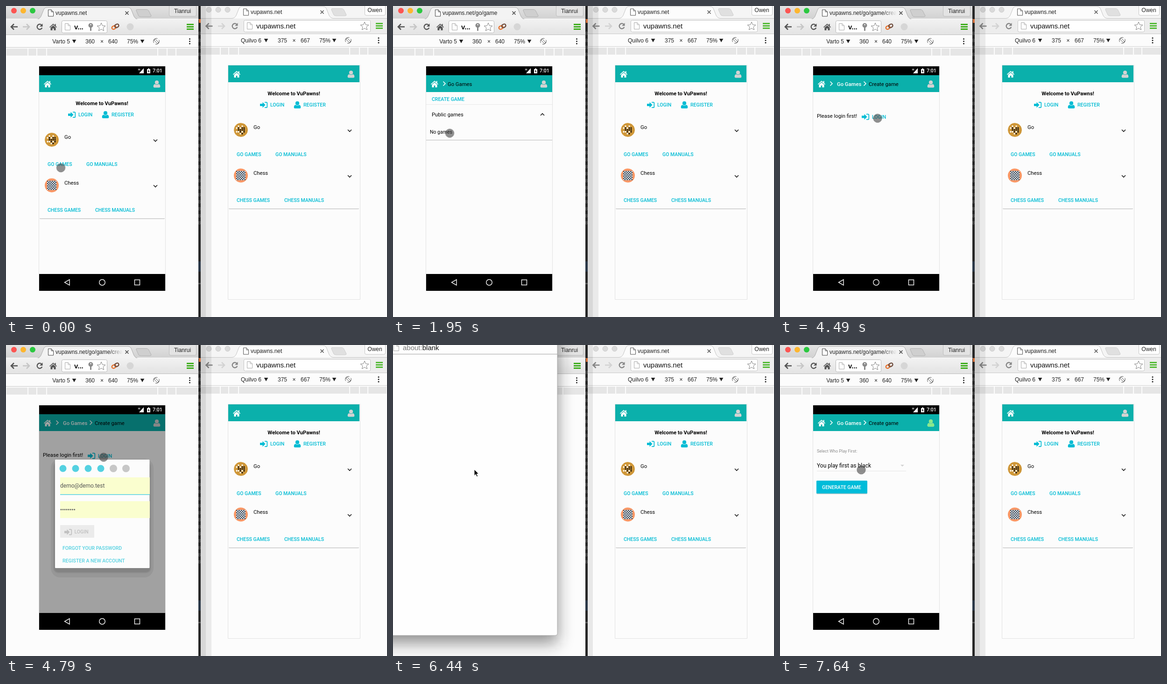
An HTML page that plays this animation: 816 px wide and 665 px high, repeating every 8 s.

```html
<!DOCTYPE html>
<html lang="en">
<head>
<meta charset="utf-8">
<title>Board games demo</title>
<style>
html, body { margin: 0; width: 100%; height: 100%; overflow: hidden; background: #fcfcfc; }
svg { display: block; width: 100%; height: 100%; }
text { white-space: pre; }
.ui { font: 12px "Liberation Sans", Arial, sans-serif; fill: #222; }
.url { font-size: 15px; fill: #111; }
.app { font: 11.25px Roboto, sans-serif; fill: #000; }
.btn { font-size: 10.5px; font-weight: 500; fill: #00bcd4; }
.cyan { fill: #00bcd4; color: #00bcd4; }
.line { fill: none; stroke: currentColor; }

/* One loop is 8 s; 1.875% is 150 ms. */
.anim { animation: 8s step-end infinite; }
.home { animation-name: home; }
.game { animation-name: game; }
.create { animation-name: create; }
.ask { animation-name: ask; }
.form { animation-name: form; }
.dialog { animation-name: dialog; }
.focus { animation-name: focus; }
.hover { animation-name: hover; }
.popup { animation-name: popup; }
.front { animation-name: front; }
.arrow { animation-name: arrow; }
.touch { animation-name: touch; }
.path { animation-name: path; }

@keyframes home { 0% { visibility: visible } 7.5%, 100% { visibility: hidden } }
@keyframes game { 0% { visibility: hidden } 7.5% { visibility: visible } 37.5%, 100% { visibility: hidden } }
@keyframes create { 0% { visibility: hidden } 37.5%, 100% { visibility: visible } }
@keyframes ask { 0% { visibility: hidden } 37.5% { visibility: visible } 93.625%, 100% { visibility: hidden } }
@keyframes form { 0% { visibility: hidden } 93.625%, 100% { visibility: visible } }
@keyframes dialog {
  0% { opacity: 0 }
  56.125% { opacity: 0; animation-timing-function: steps(3) }
  61.75% { opacity: 1 }
  93.625% { opacity: .4 }
  95.5%, 100% { opacity: 0 }
}
@keyframes focus { 0% { visibility: visible } 89.875%, 100% { visibility: hidden } }
@keyframes hover { 0% { opacity: 0 } 67.375% { opacity: 1 } 74.875% { opacity: .25 } 89.875%, 100% { opacity: 1 } }
@keyframes popup { 0% { visibility: hidden } 78.625% { visibility: visible } 89.875%, 100% { visibility: hidden } }
@keyframes front { 0% { visibility: visible } 78.625% { visibility: hidden } 89.875%, 100% { visibility: visible } }
@keyframes arrow { 0% { visibility: hidden } 74.875% { visibility: visible } 91.75%, 100% { visibility: hidden } }
@keyframes touch { 0% { visibility: visible } 74.875% { visibility: hidden } 91.75%, 100% { visibility: visible } }
@keyframes path {
  0% { transform: translate(117.5px, 346px) }
  5.625% { transform: translate(117.5px, 346px); animation-timing-function: steps(4) }
  13.125% { transform: translate(125px, 204px); animation-timing-function: steps(5) }
  22.5% { transform: translate(128px, 277px) }
  24.375% { transform: translate(121.5px, 272px) }
  26.25% { transform: translate(124px, 251px); animation-timing-function: steps(3) }
  31.875% { transform: translate(119px, 203px) }
  37.5% { transform: translate(119px, 203px); animation-timing-function: steps(5) }
  46.75% { transform: translate(209px, 240px) }
  59.875% { transform: translate(209px, 240px); animation-timing-function: steps(4) }
  67.375% { transform: translate(174px, 266px) }
  95.5%, 100% { transform: translate(174px, 267px) }
}
</style>
</head>
<body>
<svg viewBox="0 0 816 665" preserveAspectRatio="none">
<defs>
  <linearGradient id="strip" x2="0" y2="1"><stop stop-color="#e2e2e2"/><stop offset="1" stop-color="#d2d2d2"/></linearGradient>
  <linearGradient id="bar" x2="0" y2="1"><stop stop-color="#f2f2f2"/><stop offset="1" stop-color="#e3e3e3"/></linearGradient>
  <linearGradient id="fade"><stop stop-color="#f3f3f3" stop-opacity="0"/><stop offset="1" stop-color="#f3f3f3"/></linearGradient>
  <filter id="soft" x="-30%" y="-30%" width="160%" height="160%"><feGaussianBlur stdDeviation="17"/></filter>
  <filter id="glow" x="-10%" y="-10%" width="120%" height="120%"><feGaussianBlur stdDeviation="1.5"/></filter>
  <clipPath id="title"><path d="M100 4H249V26H100z"/></clipPath>
  <clipPath id="disc"><circle r="15"/></clipPath>
  <pattern id="check" width="5" height="5" patternUnits="userSpaceOnUse">
    <path fill="#fff" d="M0 0h5v5H0z"/><path fill="#1d3044" d="M0 0h2.5v2.5H0zM2.5 2.5h2.5v2.5H2.5z"/>
  </pattern>
  <pattern id="grid" width="4" height="4" patternUnits="userSpaceOnUse">
    <path d="M0 0H4M0 0V4" stroke="#a87424" stroke-width=".6"/>
  </pattern>
  <pattern id="digits" width="6" height="15" patternUnits="userSpaceOnUse" x="412" y="95">
    <text x="-1" y="12" font-family="Liberation Mono, monospace" font-size="11" fill="#666">8</text>
  </pattern>

  <path id="house" d="M0 8 8 .8 11.5 4V1.6h2.2V6L16 8l-1 1.2L8 3 1 9.2zM2.5 9.2 8 4.4l5.5 4.8V15h-4v-4h-3v4h-4z"/>
  <g id="user"><circle cy="-3.6" r="4.1"/><path d="M-4 0C-7 .6-7.3 3.6-7.3 5.5Q-7.3 7.6-5 7.6H5Q7.3 7.6 7.3 5.5C7.3 3.6 7 .6 4 0Q0 2.5-4 0z"/></g>
  <g id="enter"><path d="M0-2.5H5.5V-6L11.5 0 5.5 6V2.5H0z"/><path class="line" stroke-width="1.7" d="M10-5.7H13.5Q15.3-5.7 15.3-4V4Q15.3 5.7 13.5 5.7H10"/></g>
  <path id="down" class="line" stroke-width="1.7" d="M-4-2 0 2 4-2"/>
  <path id="next" class="line" stroke-width="1.6" d="M-2.5-4.5 2 0-2.5 4.5"/>
  <path id="tri" d="M-4.3-3.5H4.3L0 4z"/>
  <path id="page" d="M.5.5H7L11.5 5V14.5H.5zM7 .5V5H11.5"/>
  <path id="back" class="line" stroke-width="2.6" d="M8 0H-6M0-6-6 0 0 6"/>
  <g id="reload"><path class="line" stroke-width="2.3" d="M4-4A5.5 5.5 0 1 0 5.3 2"/><path d="M6.5-7V-.5H0z" fill="currentColor"/></g>
  <path id="star" d="M0-9 2.5-2.9 9-2.5 4 1.7 5.6 8 0 4.6-5.6 8-4 1.7-9-2.5-2.5-2.9z" fill="#fff" stroke="#858585"/>
  <path id="menu" d="M0 0H15V3H0zM0 5H15V8H0zM0 10H15V13H0z"/>
  <path id="cross" class="line" stroke-width="1.5" d="M-3.5-3.5 3.5 3.5M3.5-3.5-3.5 3.5"/>
  <g id="dots"><circle cy="-5" r="1.5"/><circle r="1.5"/><circle cy="5" r="1.5"/></g>
  <g id="turn" fill="none" stroke="#555"><circle r="6.3" stroke-dasharray="15.8 4" stroke-dashoffset="4"/><path d="M-5-2.5-2.5-5 5 2.5 2.5 5z"/></g>

  <g id="intro">
    <text x="616.5" y="191" text-anchor="middle" font-weight="700">Welcome to VuPawns!</text>
    <use href="#enter" class="cyan" x="544" y="211.5"/>
    <text class="btn" x="566" y="215">LOGIN</text>
    <use href="#user" class="cyan" x="624" y="211.5"/>
    <text class="btn" x="637" y="215">REGISTER</text>
  </g>
  <g id="cards">
    <g transform="translate(503 265)" clip-path="url(#disc)">
      <circle r="15" fill="#d69d3c"/><path fill="url(#grid)" d="M-15-15H15V15H-15z"/>
      <g stroke-linecap="round" stroke-width="3.3" fill="none">
        <path stroke="#fff" d="M-9-4h0M-5-8h0M-5 4h0M-1-4h0M3-8h0M-9 4h0M3 4h0M-1 8h0"/>
        <path stroke="#1d1710" d="M-5-4h0M-5 0h0M-1 0h0M3-4h0M3 0h0M7-4h0M7 0h0M-1 4h0M7 4h0M3 8h0"/>
      </g>
    </g>
    <text x="530" y="263">Go</text>
    <text class="btn" x="494" y="321">GO GAMES</text>
    <text class="btn" x="577" y="321">GO MANUALS</text>
    <g transform="translate(503 362.5)">
      <circle r="15" fill="#fa9765"/><path fill="url(#check)" d="M-10-10H10V10H-10z"/>
    </g>
    <text x="530" y="361">Chess</text>
    <text class="btn" x="494" y="419">CHESS GAMES</text>
    <text class="btn" x="596" y="419">CHESS MANUALS</text>
  </g>
  <g id="carets" color="#222"><use href="#down" x="736" y="266.5"/><use href="#down" x="736" y="364"/></g>
</defs>

<path fill="#fcfcfc" d="M0 0H816V665H0z"/>

<!-- right browser window -->
<g class="ui">
  <path fill="#f5f5f5" d="M417 0H816V27H417z"/>
  <g fill="#dadada" stroke="#cbcbcb"><circle cx="434.5" cy="8" r="5.5"/><circle cx="454.5" cy="8" r="5.5"/><circle cx="474.5" cy="8" r="5.5"/></g>
  <path fill="#fcfcfc" stroke="#c4c4c4" d="M417 26.5H484Q490 26 493 20L499 5Q501 1 505 1H679Q684 1 686 5L692 20Q695 26 701 26.5H816"/>
  <path fill="#ededed" d="M417 27H816V59H417z"/>
  <path fill="#e0e0e0" stroke="#cdcdcd" d="M697 8Q696 5.5 699 5.5H719Q722 5.5 723.5 8L729 19Q729 21 726 21H707Q703 21 702 19z"/>
  <use href="#page" x="508" y="5.5" fill="#fff" stroke="#555"/>
  <text x="524" y="17">vupawns.net</text>
  <use href="#cross" x="677" y="13" color="#555"/>
  <rect x="768.5" y="-4" width="44" height="24" rx="3" fill="#fff" stroke="#c5c5c5"/>
  <text x="790" y="13" text-anchor="middle">Owen</text>
  <use href="#back" x="434.5" y="43" color="#858585"/>
  <use href="#back" transform="matrix(-1 0 0 1 462 43)" color="#d3d3d3"/>
  <use href="#reload" x="490" y="43" color="#858585"/>
  <rect x="509.5" y="30.5" width="271" height="25" rx="3" fill="#fff" stroke="#c2c2c2"/>
  <use href="#page" x="516" y="35" fill="#fff" stroke="#aaa"/>
  <text class="url" x="536" y="48">vupawns.net</text>
  <use href="#star" x="768" y="43"/>
  <use href="#menu" x="792" y="36" fill="#55bb38"/>
  <path fill="#c8c8c8" d="M417 59H816V60H417z"/>
  <path fill="#d0d0d0" d="M417 86H816V87H417z"/>
  <text x="547" y="78" text-anchor="end">Quilvo 6</text><use href="#tri" x="557" y="73.5"/>
  <text x="582" y="78">375</text><text x="613.5" y="78">×</text><text x="631" y="78">667</text>
  <text x="671" y="78">75%</text><use href="#tri" x="703" y="73.5"/>
  <use href="#turn" x="733" y="73.5"/><use href="#dots" x="798" y="73.5"/>
  <path fill="#e6e6e6" d="M417 89H458V104H417zM460 89H476V104H460zM478 89H497V104H478zM499 89H735V104H499zM737 89H756V104H737zM758 89H774V104H758zM776 89H815V104H776z"/>
</g>
<g class="app">
  <path fill="none" stroke="#e2e2e2" d="M475.5 126.5H758.5V627.5H475.5z"/>
  <path fill="#0bb0ab" d="M476 127H757V163H476z"/>
  <use href="#house" x="486" y="138" fill="#fff"/>
  <use href="#user" x="739" y="146" fill="#d3d3d3"/>
  <use href="#intro"/><use href="#cards"/><use href="#carets"/>
  <path fill="#c4c4c4" d="M477 433H756V434H477z"/><path fill="#e8e8e8" d="M478 434H755V435H478z"/>
</g>
<path opacity=".08" d="M417 0H428V665H417z"/>
<path class="anim front" opacity=".07" d="M417 0H440V665H417z"/>

<!-- editor showing through the gap -->
<path fill="#272727" d="M412 0H417V665H412z"/>
<path fill="url(#digits)" d="M412 50H417V467H412z"/>
<path fill="#d9713a" d="M413 28H417V36H413z"/>
<path fill="#2b3848" d="M412 546H417V568H412z"/>
<path fill="#555" d="M412 592H417V595H412z"/>

<!-- left browser window -->
<g class="ui">
  <path fill="url(#strip)" d="M0 0H412V27H0z"/>
  <circle cx="17" cy="10" r="6" fill="#fc5552"/><circle cx="37" cy="10" r="6" fill="#fdb62f"/><circle cx="57" cy="10" r="6" fill="#2bc840"/>
  <path fill="#f3f3f3" stroke="#aaa" d="M-1 28.5H66Q72 28 75 22L81 7Q83 3 87 3H262Q266 3 268 7L274 22Q277 28 283 28.5H413"/>
  <path fill="url(#bar)" d="M0 28H412V61H0z"/>
  <path fill="#cfcfcf" stroke="#b2b2b2" d="M279 10Q278 7.5 281 7.5H301Q304 7.5 305.5 10L311 21Q311 23 308 23H289Q285 23 284 21z"/>
  <use href="#page" x="90" y="7.5" fill="#fff" stroke="#444"/>
  <g clip-path="url(#title)">
    <text class="anim home" x="106" y="19">vupawns.net</text>
    <text class="anim game" x="106" y="19">vupawns.net/go/game</text>
    <text class="anim create" x="106" y="19">vupawns.net/go/game/create</text>
  </g>
  <path fill="url(#fade)" d="M222 8H250V24H222z"/>
  <use href="#cross" x="259" y="15" color="#444"/>
  <rect x="349.5" y="-4" width="58" height="26" rx="3" fill="#e3e3e3" stroke="#bcbcbc"/>
  <text x="378" y="15" text-anchor="middle">Tianrui</text>
  <use href="#back" x="17" y="44.5" color="#555"/>
  <use href="#back" transform="matrix(-1 0 0 1 44 44.5)" color="#c6c6c6"/>
  <use href="#reload" x="72" y="44.5" color="#555"/>
  <use href="#house" x="93" y="37" fill="#555"/>
  <rect x="119.5" y="31.5" width="97" height="26" rx="3" fill="#fff" stroke="#b8b8b8"/>
  <use href="#page" x="126" y="37" fill="#fff" stroke="#aaa"/>
  <text class="url" x="146" y="50" font-weight="700">v...</text>
  <g fill="#8a8a8a"><circle cx="181.5" cy="41.5" r="5"/><path d="M180 45H183V53H180z"/><circle cx="181.5" cy="40" r="1.3" fill="#fff"/></g>
  <use href="#star" x="204" y="45"/>
  <g fill="none" stroke-width="2.3" transform="rotate(-30 234 44)"><rect x="226" y="41" width="9" height="6.5" rx="3.2" stroke="#e8702a"/><rect x="233" y="41" width="9" height="6.5" rx="3.2" stroke="#6d4b3c"/></g>
  <circle cx="266" cy="44.5" r="7.5" fill="#d6d6d6"/>
  <use href="#menu" x="387" y="38" fill="#3fae1e"/>
  <path fill="#bdbdbd" d="M0 61H412V62H0z"/>
  <path fill="#fcfcfc" d="M0 62H412V88H0z"/>
  <path fill="#c6c6c6" d="M0 88H412V89H0z"/>
  <text x="137" y="80" text-anchor="end">Varto 5</text><use href="#tri" x="146" y="75.5"/>
  <text x="170" y="80">360</text><text x="202" y="80">×</text><text x="219" y="80">640</text>
  <text x="259" y="80">75%</text><use href="#tri" x="292" y="75.5"/>
  <use href="#turn" x="322" y="75.5"/><use href="#dots" x="393.5" y="75.5"/>
  <path fill="#e6e6e6" d="M1 91H46V106H1zM48 91H65V106H48zM67 91H86V106H67zM88 91H324V106H88zM326 91H344V106H326zM346 91H363V106H346zM365 91H411V106H365z"/>
</g>

<!-- left phone -->
<g class="app">
  <path fill="none" stroke="#e2e2e2" d="M70.5 128.5H341.5V609H70.5z"/>
  <path d="M71 129H341V148H71zM71 573H341V609H71z"/>
  <path fill="#0bb0ab" d="M71 148H341V184H71z"/>
  <g fill="#fff">
    <text x="283" y="138" font-size="6" font-weight="700">H</text>
    <path d="M295 133V144H285z"/><path d="M302 135H304V133.500H307V135H309V144H302z"/>
    <path d="M306 136 303.5 140H305.3L304.8 143 307.5 139H305.7z" fill="#000"/>
    <text x="314" y="142" font-size="10.5" font-weight="500">7:01</text>
    <use href="#house" x="81" y="159"/>
  </g>
  <use href="#user" x="323" y="167" fill="#d3d3d3"/>
  <g fill="none" stroke="#eee" stroke-width="1.5"><path d="M136 585V597L125.5 591z"/><circle cx="206" cy="591" r="6.2"/><path d="M275.5 585.5H286.5V596.5H275.5z"/></g>

  <g class="anim home">
    <use href="#intro" x="-411" y="21"/><use href="#cards" x="-405" y="21"/><use href="#carets" x="-416" y="21"/>
    <path fill="#c4c4c4" d="M72 454H340V455H72z"/><path fill="#e8e8e8" d="M73 455H339V456H73z"/>
  </g>

  <g class="anim game">
    <use href="#next" x="110" y="166" color="#fff"/>
    <text x="117" y="171">Go Games</text>
    <text class="btn" x="83" y="203">CREATE GAME</text>
    <path fill="#e8e8e8" d="M71 210H341V211H71z"/>
    <text x="83" y="236">Public games</text>
    <use href="#down" transform="translate(320 232) scale(1 -1)" color="#222"/>
    <text x="79" y="273" font-size="10.5">No games</text>
    <path fill="#c8c8c8" d="M71 286H341V287H71z"/><path fill="#e9e9e9" d="M71 287H341V288H71z"/>
  </g>

  <g class="anim create">
    <use href="#next" x="110" y="166" color="#fff"/><use href="#next" x="182" y="166" color="#fff"/>
    <text x="122" y="171" font-weight="500" fill="#fff">Go Games</text>
    <text x="190" y="171">Create game</text>
  </g>
  <g class="anim ask">
    <text x="79" y="239">Please login first!</text>
    <use href="#enter" class="cyan" x="175" y="237"/>
    <text class="btn" x="197" y="240.5">LOGIN</text>
  </g>
  <g class="anim form">
    <use href="#user" x="323" y="167" fill="#8aea8a"/>
    <text x="79" y="230" font-size="9" fill="#8b8b8b">Select Who Play First:</text>
    <text x="79" y="262" font-size="12">You play first as black</text>
    <path fill="#d4d4d4" d="M258 256H266L262 260z"/><path fill="#e4e4e4" d="M79 269H270V270H79z"/>
    <rect x="78" y="291.5" width="109" height="27.5" rx="2" fill="#ccc"/>
    <rect x="78" y="290" width="109" height="27.5" rx="1.5" fill="#00bcd9"/>
    <text class="btn" x="90" y="308" style="fill:#fff">GENERATE GAME</text>
  </g>

  <g class="anim dialog">
    <path opacity=".54" d="M71 148H341V573H71z"/>
    <rect x="96" y="243" width="220" height="254" rx="20" opacity=".13"/>
    <rect x="102" y="250" width="208" height="237" rx="10" opacity=".3" filter="url(#glow)"/>
    <rect x="105" y="245" width="202.5" height="232" rx="1.5" fill="#fcfcfc"/>
    <rect class="anim hover" x="163" y="250" width="26" height="26" rx="1" fill="#e2e2e2"/>
    <g class="cyan"><circle cx="122" cy="264" r="7.5"/><circle cx="149" cy="264" r="7.5"/><circle cx="176" cy="264" r="7.5"/><circle cx="203" cy="264" r="7.5"/></g>
    <g fill="#adadad"><circle cx="230" cy="264" r="8"/><circle cx="257" cy="264" r="8"/></g>
    <path fill="#f9ffb9" d="M116 283H308V319H116zM116 334H308V370H116z"/>
    <text x="116" y="305" font-size="12">demo@demo.test</text>
    <g class="anim focus"><path class="cyan" d="M116 319H308V320.5H116z"/></g>
    <path d="M118 352H148" stroke="#111" stroke-width="2.8" stroke-linecap="round" stroke-dasharray="0 4.1"/>
    <rect x="116" y="385" width="73" height="27" rx="1" fill="#e3e3e3"/>
    <use href="#enter" x="125" y="400" fill="#a3a3a3" color="#a3a3a3"/>
    <text class="btn" x="146.5" y="403" style="fill:#a3a3a3">LOGIN</text>
    <text class="btn" x="121" y="438">FORGOT YOUR PASSWORD</text>
    <text class="btn" x="121" y="465">REGISTER A NEW ACCOUNT</text>
  </g>
</g>

<!-- popup window -->
<g class="anim popup ui">
  <rect x="-60" y="-40" width="412" height="677" opacity=".5" filter="url(#soft)"/>
  <rect x="-10" y="-10" width="362" height="631" rx="4" fill="#fefefe" stroke="#a5a5a5" stroke-width=".8"/>
  <path fill="#a0a0a0" d="M0 19H352V20H0z"/>
  <use href="#page" x="1" y="-2" fill="#fff" stroke="#aaa"/>
  <text class="url" x="21" y="11"><tspan fill="#777">about:</tspan>blank</text>
</g>

<!-- pointer -->
<g class="anim path">
  <circle class="anim touch" r="9.3" fill="#3c3c3c" fill-opacity=".57" stroke="#555" stroke-opacity=".35"/>
  <path class="anim arrow" d="M0 0V13.5L3.2 10.6 5.4 15.6 7.7 14.6 5.5 9.7H9.6z" stroke="#fff"/>
</g>
</svg>
</body>
</html>
```
